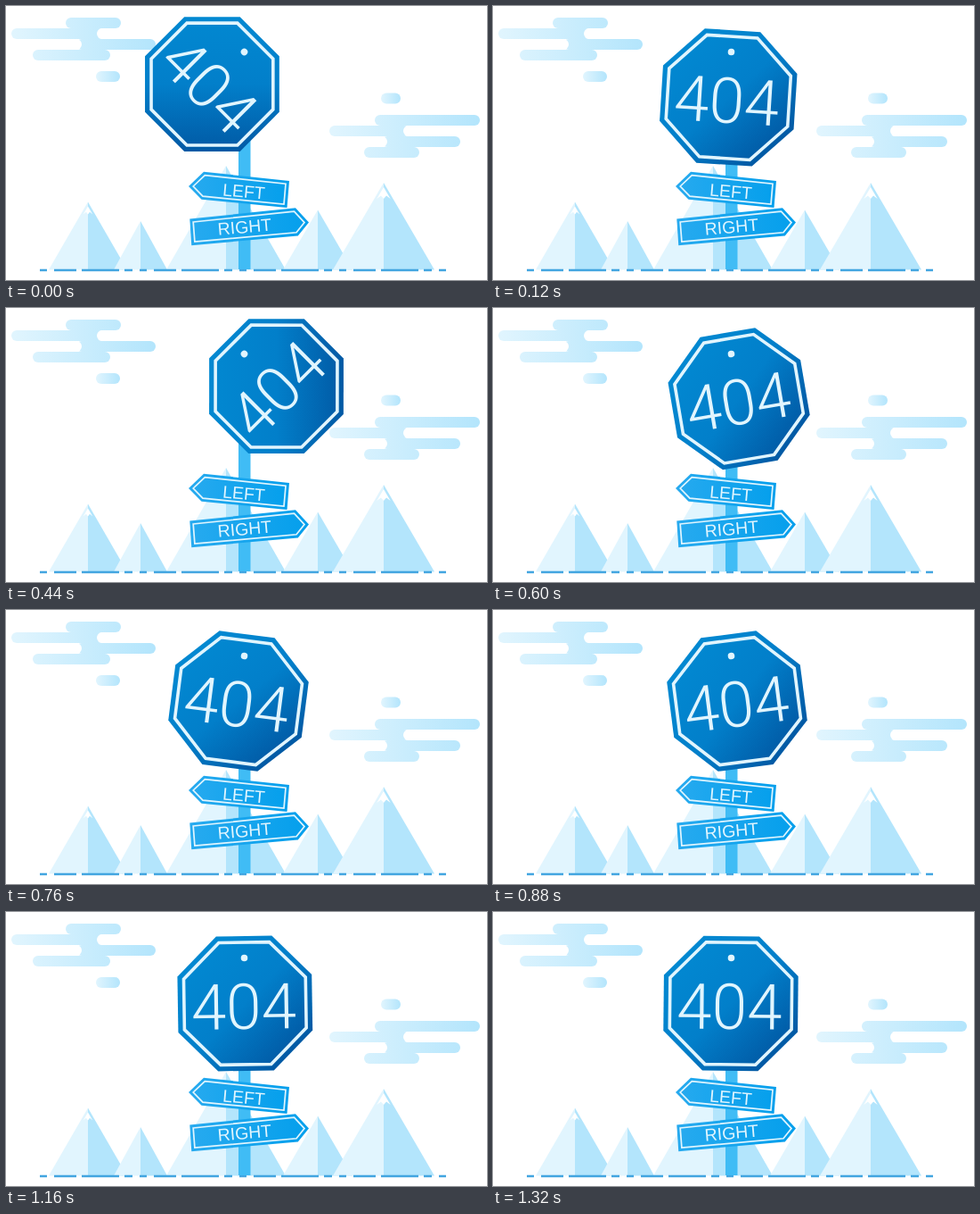
These frames come from a looping animation (540x307 px, 1360 ms). An HTML page:

```html
<!DOCTYPE html>
<html lang="en">
<head>
<meta charset="utf-8">
<title>404</title>
<style>
  html, body { margin: 0; width: 100%; height: 100%; overflow: hidden; background: #fff; }
  svg { display: block; width: 100%; height: 100%; }
  text { font: 19.5px "Liberation Sans", Arial, sans-serif; text-anchor: middle; fill: #e1f5fe; }
  #sign text { font: 300 71px Roboto, sans-serif; }
  .line { fill: none; stroke: #e1f5fe; stroke-width: 1.7; }
</style>
</head>
<body>
<svg viewBox="0 0 540 307">
  <defs>
    <linearGradient id="pill">
      <stop offset="0" stop-color="#e1f5fe"/><stop offset="1" stop-color="#b3e5fc"/>
    </linearGradient>
    <linearGradient id="cloudL" href="#pill" gradientUnits="userSpaceOnUse" x1="6" x2="168" y1="0" y2="0"/>
    <linearGradient id="cloudR" href="#pill" gradientUnits="userSpaceOnUse" x1="363" x2="532" y1="0" y2="0"/>
    <linearGradient id="board">
      <stop offset="0" stop-color="#27aaef"/><stop offset="1" stop-color="#049fec"/>
    </linearGradient>
    <linearGradient id="face" x1=".15" y1=".15" x2=".85" y2=".85">
      <stop offset="0" stop-color="#0288d1"/><stop offset=".5" stop-color="#027fca"/>
      <stop offset="1" stop-color="#015aa5"/>
    </linearGradient>
  </defs>

  <g fill="url(#cloudL)">
    <rect x="67" y="13" width="62" height="12" rx="6"/>
    <rect x="6" y="25" width="104" height="12" rx="6"/>
    <rect x="79" y="37" width="89" height="12" rx="6"/>
    <rect x="30" y="49" width="87" height="12" rx="6"/>
  </g>
  <g fill="#fff">
    <rect x="102" y="25" width="30" height="12" rx="6"/>
    <rect x="55" y="37" width="30" height="12" rx="6"/>
  </g>
  <g fill="url(#cloudR)">
    <rect x="414" y="122" width="118" height="12" rx="6"/>
    <rect x="363" y="134" width="90" height="12" rx="6"/>
    <rect x="422" y="146" width="88" height="12" rx="6"/>
    <rect x="402" y="158" width="62" height="12" rx="6"/>
  </g>
  <g fill="#fff">
    <rect x="446" y="134" width="30" height="12" rx="6"/>
    <rect x="398" y="146" width="30" height="12" rx="6"/>
  </g>
  <g fill="url(#pill)">
    <rect x="101" y="73" width="27" height="12" rx="6"/>
    <rect x="421" y="97.500" width="22" height="12" rx="6"/>
  </g>

  <g id="hills"></g>
  <path d="M38 296H497" stroke="#42a5e0" stroke-width="2.500" stroke-dasharray="8 8 25 6 42 6 9 8"/>
  <rect x="261" y="100" width="13.500" height="195" fill="#40bcf5"/>

  <path d="M205 202L222 185.700L318 196L315.500 226L219.500 216.800Z" fill="url(#board)"/>
  <path class="line" d="M210.200 202L223.300 189.600L314 199.200L312 222L220.900 213.200Z"/>
  <text transform="translate(266.500 214.500) rotate(5)">LEFT</text>
  <path d="M206.300 238.600L325 226.200L340 242.600L327.800 257.500L208.300 268.200Z" fill="url(#board)"/>
  <path class="line" d="M210.200 242L323.500 230.200L335 242.600L326 253.800L211.900 264.100Z"/>
  <text transform="translate(268.500 254.200) rotate(-5)">RIGHT</text>

  <g id="sign">
    <path id="plate" fill="url(#face)"/>
    <path id="trim" class="line" style="stroke-width:3.6"/>
    <circle r="3.800" fill="#e1f5fe"/>
    <text x="-1.500" y="79.500">404</text>
  </g>
</svg>
<script>
const $ = id => document.getElementById(id);
const LOOP = 1360, STEP = 40, ARM = 51;

// Octagon with the given half height, hung below the pivot.
function octagon(a) {
  const pts = [];
  for (let i = 0; i < 8; i++) {
    const q = (i + 0.5) * Math.PI / 4, r = a / Math.cos(Math.PI / 8);
    pts.push((r * Math.cos(q)).toFixed(2) + ' ' + (ARM + r * Math.sin(q)).toFixed(2));
  }
  return 'M' + pts.join('L') + 'Z';
}
$('plate').setAttribute('d', octagon(75.4));
$('trim').setAttribute('d', octagon(68.4));

// Hill: left foot, peak x, peak y, right foot, depth of the snow.
const hills = [
  [48, 92, 219.5, 136, 14], [121, 151, 241, 181, 0], [180, 247, 179, 314, 0],
  [311, 350, 228.5, 389, 0], [367, 424, 198, 481, 18]
];
const BASE = 295.5, INSET = 5;
function snow(x, y, s, slope) {
  const w = (s - INSET) * slope, at = (u, v) => `${x + u * w} ${y + v * s}`;
  return `<path fill="#fff" d="M${x} ${y + INSET}L${at(-1, 1)}L${at(-0.4, 0.8)}L${at(0, 1)}L${at(0.4, 0.8)}L${at(1, 1)}Z"/>`;
}
$('hills').innerHTML = hills.map(([l, x, y, r, s]) =>
  `<path fill="#e1f5fe" d="M${l} ${BASE}L${x} ${y}V${BASE}Z"/>` +
  `<path fill="#b3e5fc" d="M${x} ${y}L${r} ${BASE}H${x}Z"/>` +
  (s ? snow(x, y, s, (x - l) / (BASE - y)) : '')
).join('');

// Swing turning points: time, angle, share of ease-out on the way there.
const swing = [
  [0, 45, 0], [453, -45, 1], [708, 12, 0], [870, -8, 0],
  [1080, 5.5, 0.5], [1220, -5, 0], [1330, 0.7, 0], [LOOP, 0.7, 0]
];
function angle(t) {
  const i = swing.findIndex(k => k[0] > t);
  const [t0, a0] = swing[i - 1], [t1, a1, out] = swing[i];
  const x = (t - t0) / (t1 - t0);
  const sine = 0.5 - 0.5 * Math.cos(Math.PI * x), quad = 1 - (1 - x) ** 2;
  return a0 + (a1 - a0) * (sine + (quad - sine) * out);
}

function draw(now) {
  const t = Math.floor((now % LOOP) / STEP) * STEP;
  $('sign').setAttribute('transform', `translate(267.500 51.500) rotate(${angle(t).toFixed(2)})`);
}
function tick(now) {
  draw(now);
  requestAnimationFrame(tick);
}
draw(0);
requestAnimationFrame(tick);
</script>
</body>
</html>
```
